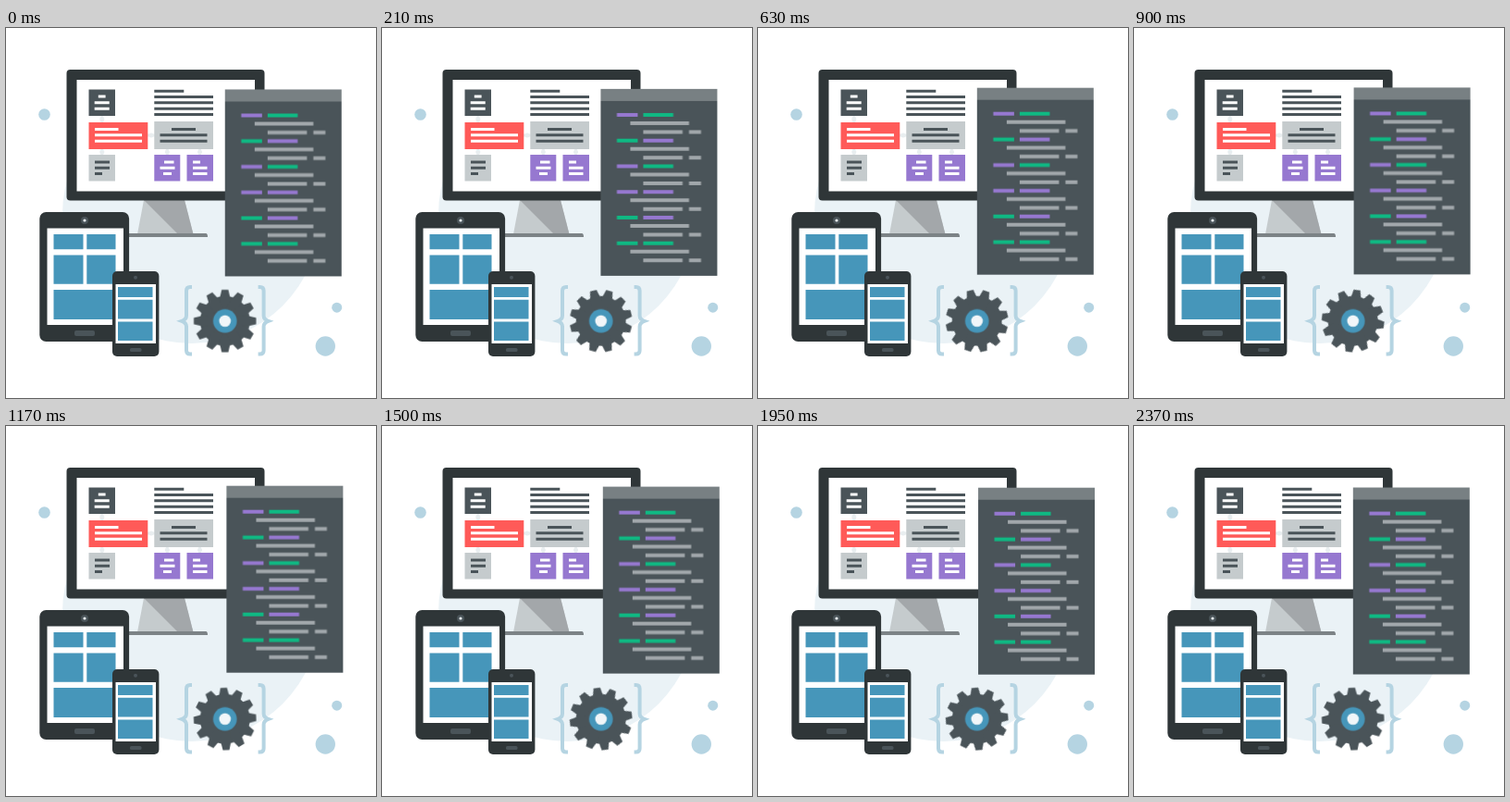
Recreate the animation shown at these times as an HTML page. Size 400 px wide and 400 px high, loop 2.4 s.

```html
<!DOCTYPE html>
<html lang="en">
<head>
<meta charset="utf-8">
<title>Web development</title>
<style>
  html, body { margin: 0; width: 100%; height: 100%; overflow: hidden; background: #fff; }
  svg { display: block; width: 100%; height: 100%; }
  .ink { fill: #2f3638; }
  .slate { fill: #4a5459; }
  .silver { fill: #c5cbcd; }
  .blue { fill: #4696ba; }
  .sky { fill: #b5d4e2; }
  .violet { fill: #9678d0; }
  .white { fill: #fff; }
  .line { fill: none; stroke-width: 3; }
  .line.white { stroke: #fff; }
  .line.slate { stroke: #4a5459; }
  .code { fill: none; stroke-width: 4; }
  .drift { animation: drift 2.4s steps(80) infinite; }
  .spin { animation: spin 2.4s steps(80) infinite; }
  @keyframes drift {
    from { transform: rotate(135deg) translate(1.2px) rotate(-135deg); }
    to { transform: rotate(495deg) translate(1.2px) rotate(-495deg); }
  }
  @keyframes spin {
    from { transform: rotate(0deg); }
    to { transform: rotate(180deg); }
  }
</style>
</head>
<body>
<svg viewBox="0 0 400 400">
  <defs>
    <path id="teeth" d="M-5.6-25L-3.6-33.7H3.6L5.6-25V25L3.6 33.7H-3.6L-5.6 25Z"/>
    <path id="body" d="M32 37h63.5M46 46.6h42.5M95.5 46.6h13"/>
    <path id="brace" d="M201 280h-2q-4 0-4 4v27q0 4-5 5.8q5 1.8 5 5.8v26q0 4 4 4h2"/>
  </defs>

  <circle cx="200.5" cy="201.5" r="139.5" fill="#eaf2f6"/>
  <g class="sky">
    <circle cx="41.5" cy="93.5" r="6.3"/>
    <circle cx="357.7" cy="302.2" r="5.5"/>
    <circle cx="345.3" cy="344" r="10.7"/>
  </g>

  <!-- Monitor -->
  <path class="silver" d="M149 186h44l9.5 37H142Z"/>
  <path fill="#a3a7aa" d="M149 186h44l9.5 37H186Z"/>
  <path fill="#7c8386" d="M128 222h88q2 0 2 4h-90Z"/>
  <rect class="ink" x="65.5" y="45" width="214" height="141.5" rx="4"/>
  <path class="white" d="M76.5 56h192.5v120.5H76.5Z"/>
  <path d="M103.8 95v42M153 116h8M174.3 131v6M209.5 131v6" fill="none" stroke="#e9eef0" stroke-width="3"/>
  <g fill="#e9eef0">
    <circle cx="103.8" cy="98.5" r="2.5"/>
    <circle cx="103.8" cy="134" r="2.5"/>
    <circle cx="157" cy="116" r="2.5"/>
    <circle cx="174.3" cy="134" r="2.5"/>
    <circle cx="209.5" cy="134" r="2.5"/>
  </g>
  <path class="slate" d="M89.5 66.5H118V95H89.5Z"/>
  <path fill="#ff5a58" d="M89.5 102h63.8v29H89.5Z"/>
  <path class="silver" d="M160.3 101H224v30h-63.7ZM89.5 137H118v28.5H89.5Z"/>
  <path class="violet" d="M160.3 137h28v28.5h-28ZM195.5 137H224v28.5h-28.5Z"/>
  <path class="line white" d="M99.8 74h7.8M95.7 80.8h16M95.7 87.3h16
    M96 109.5h25.5M96 115.8h51M96 122.2h51
    M171 145h10.5M166.5 151.2h16M170 157.5h9
    M202 145h8M202 151.2h15.5M202 157.5h15.5"/>
  <path class="line slate" d="M160.3 68.3h32M160.3 74.5H224M160.3 80.8H224M160.3 87.2H224M160.3 93.5H224
    M179 109.5h26M166.5 115.8h51M166.5 122.2h51
    M96 145h16M96 151.2h16M96 157.5h8"/>

  <!-- Tablet -->
  <rect class="ink" x="36.3" y="199" width="96.8" height="140" rx="7"/>
  <path class="white" d="M44.5 216.5H127V321H44.5Z"/>
  <circle class="slate" cx="85" cy="208" r="4"/>
  <circle cx="85" cy="208" r="1.6" fill="#e8eef1"/>
  <rect class="slate" x="74" y="327" width="22" height="6" rx="2"/>
  <path class="blue" d="M51.5 223h32v16.3h-32ZM87.3 223h31.2v16.3H87.3ZM51.5 245.5h32v31.2h-32Z
    M87.3 245.5h31.2v31.2H87.3ZM51.5 283h67v32h-67Z"/>

  <!-- Phone -->
  <rect class="ink" x="115" y="263" width="50.4" height="92" rx="5"/>
  <path class="white" d="M118.5 277H162v64h-43.5Z"/>
  <circle class="slate" cx="140" cy="269.7" r="2"/>
  <rect class="slate" x="134" y="346" width="12.5" height="4" rx="1.5"/>
  <path class="blue" d="M121 280h37.5v11H121ZM121 293.7h37.5v20.8H121ZM121 317.5h37.5V338H121Z"/>

  <!-- Code panel -->
  <g transform="translate(237.6 65.6)">
    <g class="drift">
      <path class="slate" d="M0 0h126v202H0Z"/>
      <path fill="#788083" d="M0 0h126v13H0Z"/>
      <g class="code" stroke="#a1a7ab">
        <use href="#body"/>
        <use href="#body" y="27.75"/>
        <use href="#body" y="55.5"/>
        <use href="#body" y="83.25"/>
        <use href="#body" y="111"/>
        <use href="#body" y="138.75"/>
      </g>
      <path class="code" stroke="#9678d0" d="M17.5 28H40M46 55.75h32.5M17.5 83.5H40M17.5 111.25H40M46 111.25h32.5M46 139h32.5"/>
      <path class="code" stroke="#0fb983" d="M46 28h32.5M17.5 55.75H40M46 83.5h32.5M17.5 139H40M17.5 166.75H40M46 166.75h32.5"/>
    </g>
  </g>

  <!-- Gear in braces -->
  <g fill="none" stroke="#b5d4e2" stroke-width="4">
    <use href="#brace"/>
    <use href="#brace" transform="matrix(-1 0 0 1 473.6 0)"/>
  </g>
  <g transform="translate(236.7 316.7)">
    <g class="spin slate">
      <circle r="27"/>
      <use href="#teeth"/>
      <use href="#teeth" transform="rotate(30)"/>
      <use href="#teeth" transform="rotate(60)"/>
      <use href="#teeth" transform="rotate(90)"/>
      <use href="#teeth" transform="rotate(120)"/>
      <use href="#teeth" transform="rotate(150)"/>
    </g>
    <circle class="blue" r="12.8"/>
    <circle r="6.3" fill="#f1f6f9"/>
  </g>
</svg>
</body>
</html>
```
